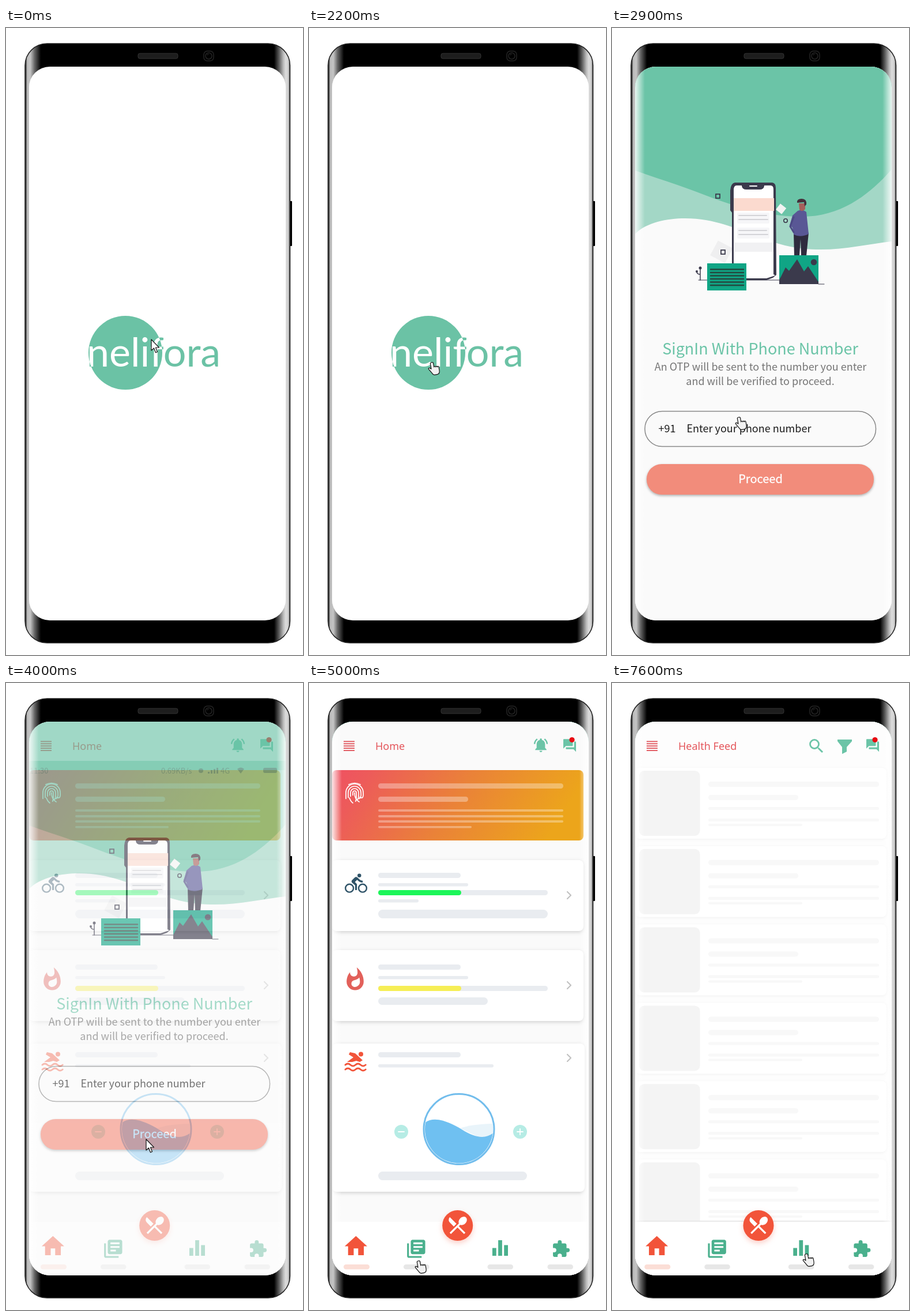
Recreate the animation shown at these times as an HTML page. Size 515x1087 px, loop 8 s.

```html
<!DOCTYPE html>
<html lang="en">
<head>
<meta charset="utf-8">
<title>App walkthrough</title>
<style>
html, body { margin: 0; width: 100%; height: 100%; overflow: hidden; background: #fff; }
svg { display: block; width: 515px; height: 1087px; }
text { white-space: pre; }
.mark { font: 400 70px Lato, sans-serif; }
.form { font-family: "Noto Sans CJK JP", "Noto Sans CJK SC", "Noto Sans CJK KR", "Noto Sans", sans-serif; }
.head { font: 18px "Noto Sans", "Open Sans", sans-serif; fill: #e4575c; }
.card { fill: #fff; filter: drop-shadow(0 2px 3px rgba(0,0,0,.17)); }
.soft { fill: #fff; filter: drop-shadow(0 1px 2px rgba(0,0,0,.05)); }
.line { fill: none; stroke-linecap: round; stroke-linejoin: round; }
</style>
</head>
<body>
<svg viewBox="0 0 515 1087" xmlns="http://www.w3.org/2000/svg">
  <defs>
    <linearGradient id="body">
      <stop offset="0" stop-color="#222"/><stop offset=".004" stop-color="#444"/>
      <stop offset=".008" stop-color="#bbb"/><stop offset=".02" stop-color="#c4c4c4"/>
      <stop offset=".036" stop-color="#666"/><stop offset=".06" stop-color="#000"/>
      <stop offset=".94" stop-color="#000"/><stop offset=".957" stop-color="#555"/>
      <stop offset=".975" stop-color="#bbb"/><stop offset=".984" stop-color="#ddd"/>
      <stop offset=".994" stop-color="#ccc"/><stop offset="1" stop-color="#333"/>
    </linearGradient>
    <linearGradient id="glow">
      <stop offset="0" stop-color="#fff" stop-opacity=".85"/>
      <stop offset="1" stop-color="#fff" stop-opacity="0"/>
    </linearGradient>
    <linearGradient id="warm" x2="1" y2=".18">
      <stop offset="0" stop-color="#ef5162"/><stop offset=".15" stop-color="#ed5b5a"/>
      <stop offset=".55" stop-color="#ea8238"/><stop offset="1" stop-color="#eca51b"/>
    </linearGradient>
    <clipPath id="screen"><rect x="40" y="67" width="445" height="960" rx="36"/></clipPath>
    <clipPath id="disc"><circle cx="207" cy="563" r="64"/></clipPath>
    <clipPath id="bowl"><circle cx="260" cy="773.5" r="59"/></clipPath>
  </defs>

  <rect x="490" y="300" width="6" height="78" rx="1"/>
  <rect x="33" y="27" width="459.500" height="1039" rx="38" fill="url(#body)" stroke="#222" stroke-width="1.500"/>
  <rect x="229" y="44" width="69" height="9" rx="3" fill="#1d1d1d" stroke="#333"/>
  <g fill="none" stroke="#242424" stroke-width="1.500">
    <rect x="343" y="40" width="17" height="17" rx="6"/><circle cx="351.500" cy="48.500" r="5.500"/>
    <path d="M349 47l2-2"/>
  </g>

  <g clip-path="url(#screen)">
    <rect x="40" y="67" width="445" height="960" fill="#fff"/>
    <circle cx="207" cy="563" r="64" fill="#6bc2a5"/>
    <text class="mark" x="140" y="587" fill="#6bc2a5">nelifora</text>
    <text class="mark" x="140" y="587" fill="#fff" clip-path="url(#disc)">nelifora</text>
    <g id="signin"></g>
    <g id="home"></g>
    <g id="status" class="form" font-size="13" font-weight="500" fill="#47665c">
      <rect x="40" y="135" width="445" height="16" fill="#5dbd9c"/>
      <text x="41" y="157">11:30</text>
      <text x="269" y="157">0.69KB/s</text>
      <circle cx="338" cy="152" r="4"/>
      <path d="M350 157v-3h3v3zM355 157v-6h3v6zM360 157v-8h3v8zM365 157v-10h3v10zM401 149q6-5 12 0l-6 8z"/>
      <text x="372" y="157">4G</text>
      <rect x="446" y="147" width="24" height="9" rx="3"/>
    </g>
    <g id="feed"></g>
    <g id="nav"></g>
    <rect x="40" y="67" width="17" height="960" fill="url(#glow)"/>
    <rect x="-485" y="67" width="16" height="960" fill="url(#glow)" transform="scale(-1 1)"/>
  </g>

  <g id="cursor" fill="#fff" stroke="#111" stroke-width="1.200" stroke-linejoin="round">
    <path id="arrow" d="M0 0V19L4.500 15 7.500 22.800 10.500 21.500 7.500 14H13.500Z"/>
    <path id="hand" fill="#f1f1f1" transform="rotate(-10)" d="M0 0c-1.500 0-2 1-2 2.200V11l-2-2c-1.500-1-3.200 0-2.300 1.800L-2 18c1 2.500 2.500 4 4 4h4.500c3.500 0 5-3 5-6.500V10c0-2-2.300-2.200-2.600-.5 0-2-2.600-2.300-2.800-.4 0-2-2.600-2.300-2.800-.4V2c0-1.300-.6-2-1.800-2z"/>
  </g>
</svg>

<script>
const $ = id => document.getElementById(id);
const rect = (x, y, w, h, fill, r = 0, extra = '') =>
  `<rect x="${x}" y="${y}" width="${w}" height="${h}" rx="${r}" fill="${fill}" ${extra}/>`;
const bar = (x, y, w, h, fill = '#e9ecf0') => rect(x, y, w, h, fill, h / 2);
const circle = (x, y, r, fill, extra = '') => `<circle cx="${x}" cy="${y}" r="${r}" fill="${fill}" ${extra}/>`;
const path = (d, fill, extra = '') => `<path d="${d}" fill="${fill}" ${extra}/>`;
const line = (d, stroke, w = 2) => `<path class="line" d="${d}" stroke="${stroke}" stroke-width="${w}"/>`;
const card = (x, y, w, h, cls = 'card') => `<rect class="${cls}" x="${x}" y="${y}" width="${w}" height="${h}" rx="8"/>`;
const text = (x, y, s, attrs = '') => `<text x="${x}" y="${y}" ${attrs}>${s}</text>`;

const icons = {
  search: 'M15.5 14h-.79l-.28-.27A6.47 6.47 0 0 0 16 9.500 6.500 6.500 0 1 0 9.500 16c1.610 0 3.090-.59 4.230-1.570l.27.28v.79l5 4.990L20.490 19zm-6 0a4.500 4.500 0 1 1 0-9 4.500 4.500 0 0 1 0 9z',
  chat: 'M21 6h-2v9H6v2c0 .55.45 1 1 1h11l4 4V7c0-.55-.45-1-1-1zm-4 6V3c0-.55-.45-1-1-1H3c-.55 0-1 .45-1 1v14l4-4h10c.55 0 1-.45 1-1z',
  bell: 'M7.580 4.080L6.150 2.650C3.750 4.480 2.170 7.300 2.030 10.500h2c.15-2.650 1.510-4.970 3.550-6.420zM19.970 10.500h2c-.15-3.200-1.730-6.020-4.120-7.850l-1.420 1.430c2.020 1.450 3.390 3.770 3.540 6.420zM18 11c0-3.070-1.640-5.640-4.500-6.320V4a1.500 1.500 0 0 0-3 0v.68C7.630 5.360 6 7.920 6 11v5l-2 2v1h16v-1l-2-2zM12 22c1.100 0 2-.9 2-2h-4c0 1.100.9 2 2 2z',
  home: 'M10 20v-6h4v6h5v-8h3L12 3 2 12h3v8z',
  chart: 'M10 20h4V4h-4zM4 20h4v-8H4zM16 9v11h4V9z',
  books: 'M4 6H2v14c0 1.100.9 2 2 2h14v-2H4zm16-4H8c-1.100 0-2 .9-2 2v12c0 1.100.9 2 2 2h12c1.100 0 2-.9 2-2V4c0-1.100-.9-2-2-2zm-1 9H9V9h10zm-4 4H9v-2h6zm4-8H9V5h10z',
  puzzle: 'M20.500 11H19V7c0-1.100-.9-2-2-2h-4V3.500a2.500 2.500 0 0 0-5 0V5H4c-1.100 0-2 .9-2 2v3.800h1.500a2.700 2.700 0 0 1 0 5.400H2V20c0 1.100.9 2 2 2h3.800v-1.500a2.700 2.700 0 0 1 5.400 0V22H17c1.100 0 2-.9 2-2v-4h1.500a2.500 2.500 0 0 0 0-5z',
  meal: 'M8.100 13.340l2.830-2.830L3.910 3.500a4 4 0 0 0 0 5.660zM14.880 11.530c1.530.71 3.680.21 5.270-1.380 1.910-1.910 2.280-4.650.81-6.120-1.460-1.460-4.200-1.100-6.120.81-1.590 1.590-2.090 3.740-1.380 5.270L3.700 19.870l1.410 1.410L12 14.410l6.880 6.880 1.410-1.410L13.410 13z',
  bike: 'M15.500 5.500a2 2 0 1 0 0-4 2 2 0 0 0 0 4zM5 12a5 5 0 1 0 0 10 5 5 0 0 0 0-10zm0 8.500a3.500 3.500 0 1 1 0-7 3.500 3.500 0 0 1 0 7zM10.800 10.500l2.400-2.400.8.8c1.300 1.300 3 2.100 5.100 2.100V9c-1.500 0-2.700-.6-3.600-1.500l-1.900-1.900c-.5-.4-1-.6-1.600-.6s-1.100.2-1.400.6L7.800 8.400c-.4.4-.6.9-.6 1.400 0 .6.2 1.100.6 1.400L11 14v5h2v-6.200zM19 12a5 5 0 1 0 0 10 5 5 0 0 0 0-10zm0 8.500a3.500 3.500 0 1 1 0-7 3.500 3.500 0 0 1 0 7z',
  fire: 'M13.500.67s.74 2.650.74 4.800c0 2.060-1.350 3.730-3.410 3.730-2.070 0-3.630-1.670-3.630-3.730l.03-.36C5.210 7.510 4 10.620 4 14a8 8 0 0 0 16 0C20 8.610 17.410 3.800 13.500.67zM11.710 19c-1.780 0-3.220-1.400-3.220-3.140 0-1.620 1.050-2.760 2.810-3.120 1.770-.36 3.600-1.210 4.620-2.580.39 1.290.59 2.650.59 4.040 0 2.650-2.150 4.800-4.800 4.800z'
};
const icon = (name, x, y, k, fill) =>
  path(icons[name], fill, `fill-rule="evenodd" transform="translate(${x} ${y}) scale(${k})"`);

const mint = '#6bc4a7', teal = '#4ab08d', coral = '#f2543a', ink = '#3b3a4c';

function signInArt() {
  let s = rect(176, 372, 29, 29, '#efeff0', 0, 'transform="rotate(28 187 386)"')
    + rect(287, 307, 13, 13, '#f1f3f2', 0, 'transform="rotate(38 293 313)"')
    + line('M150 437H292M358 444H368', ink, 1)
    + path('M213 268H278Q284 269 284 277L285 428 279 433 268 437H208V320L205 316V282Q206 269 213 268Z', ink)
    + path('M216 273H275Q280 273 280 280V427L283 429 268 434H219Q211 433 211 425V281Q211 273 216 273Z', '#fff')
    + path('M225 268H264V274Q263 280 256 280H233Q226 280 225 274Z', ink)
    + bar(238, 273, 14, 2, '#fff')
    + rect(211, 295, 70, 22, '#fbdacf')
    + rect(212, 372, 68, 16, '#f1f1f3');
  for (const y of [320, 346]) {
    s += rect(217, y, 56, 19, '#f6f6f8', 2) + bar(219, y + 4, 50, 2, '#d4d4d8') + bar(219, y + 11, 52, 2, '#d4d4d8');
  }
  for (const [x, y] of [[180, 288], [189, 385]]) {
    s += rect(x, y, 7, 7, 'none', 0, `stroke="${ink}" stroke-width="1.800"`);
  }
  s += circle(301, 334, 3.2, 'none', `stroke="${ink}" stroke-width="1.600"`);
  s += rect(165, 408, 68, 47, '#10a585');
  for (let i = 0; i < 6; i++) s += line(`M171 ${418.5 + i * 5.5}H228`, '#24483f', 2.5);
  s += line('M153 437V417M153 427Q147 427 147 422', ink, 1.5) + circle(153, 416, 2.5, ink) + circle(147, 422, 2, ink);
  // standing figure
  s += path('M315 355H341L337 395H328L327 366 325 395H316Z', '#2e2b3e')
    + path('M322 317Q330 313 337 319L341 357Q327 364 315 358L313 346 308 342 313 325Z', '#595795')
    + line('M315 328L309 344 315 354', '#4c4a84', 3)
    + path('M324 304H335V314Q330 320 325 315Z', '#a5605b')
    + path('M321 303Q320 296 329 296 338 296 337 306L334 309 333 302Z', '#44303b');
  return s + rect(290, 394, 68, 50, '#10a585')
    + path('M290 437L301 415 307 421 321 401 333 422 340 413 358 440V444H290Z', ink) + circle(350, 406, 5.3, ink);
}

$('signin').innerHTML = rect(40, 67, 445, 960, '#fafafa')
  + path('M40 67H485V370C430 376 370 394 300 377 240 362 195 330 127 330 95 330 60 337 40 357Z', '#a3d7c6')
  + path('M40 67H485V245C450 285 400 327 330 327 250 327 190 300 130 278 100 267 70 258 40 247Z', mint)
  + signInArt()
  + `<g class="form" text-anchor="middle">`
  + text(257, 566, 'SignIn With Phone Number', `font-size="27" fill="${mint}"`)
  + text(257.500, 594, 'An OTP will be sent to the number you enter', 'font-size="18" fill="#757575"')
  + text(257, 619, 'and will be verified to proceed.', 'font-size="18" fill="#757575"') + '</g>'
  + rect(57, 664.5, 400.5, 61, '#fafafa', 30, 'stroke="#888" stroke-width="1.500"')
  + `<g class="form" font-size="18" fill="#1c1c1c">` + text(80.500, 701, '+91') + text(129.500, 701, 'Enter your phone number') + '</g>'
  + rect(60, 756, 394, 53, '#f28c7b', 26, 'style="filter:drop-shadow(0 2px 2px rgba(0,0,0,.3))"')
  + text(257.500, 789, 'Proceed', 'class="form" text-anchor="middle" font-size="20" font-weight="500" fill="#fff" stroke="#fff" stroke-width=".3"');

function header(title) {
  let s = text(115, 116, title, 'class="head"');
  for (let i = 0; i < 5; i++) s += rect(60, 100.5 + i * 3.9, 19, 1.8, '#e0535a');
  return s + icon('chat', 438.8, 95, 1.1, mint) + circle(456, 98.5, 4.6, '#e80b12');
}
const chevron = y => line(`M448 ${y - 6}l6 6 -6 6`, '#c2c2c2', 2.2);
const progress = (y, color) => bar(120, y, 294, 9) + bar(120, y, 144, 9, color);
const round = (x, glyph) => circle(x, 778, 12, '#b6ece5') + line(glyph, '#fff', 1.8);

function fingerprint() {
  let s = '';
  for (let r = 3; r <= 15; r += 4) {
    s += line(`M${79 - r} ${193 + r * .5}V${190}a${r} ${r} 0 0 1 ${2 * r} 0q1 ${8 + r * .3} -${r * .4} ${17 - r * .6}`, '#fff', 1.7);
  }
  return s + line('M79 190q0 12 8 16M70 199q2 6 6 9M69 176q10-5 20 0', '#fff', 1.700);
}

function swimmer() {
  const wave = y => `M63 ${y}q4.400 -4 8.800 0t8.800 0 8.800 0 8.800 0`;
  return line(wave(662), coral, 3) + line(wave(670), coral, 3)
    + circle(90, 643.5, 4, coral) + path('M66 657L77 649 69 644 71 640 80 642 93 654 88 657 82 655 75 657Z', coral);
}

$('home').innerHTML = rect(40, 67, 445, 960, '#fafafa') + header('Home')
  + icon('bell', 387.4, 93, 1.22, mint)
  + rect(40, 151, 436, 122, 'url(#warm)', 8) + fingerprint() + '<g opacity=".33">'
  + [[174, 321, 9], [197, 156, 9], [219, 321, 4], [229, 321, 4], [238, 321, 4], [248, 162, 3.5]]
      .map(([y, w, h]) => bar(120, y, w, h, '#fff')).join('') + '</g>'
  + card(40, 307, 436, 123) + icon('bike', 62, 328, 1.63, '#2f5368')
  + bar(120, 329, 143, 9) + bar(120, 347, 156, 5.5) + progress(359, '#1cf659') + bar(120, 375, 70, 5.5) + bar(120, 393, 294, 15) + chevron(368)
  + card(40, 463, 436, 123) + icon('fire', 57.8, 491.8, 1.85, '#e2605a')
  + bar(120, 488, 143, 9) + bar(120, 508, 156, 5.5) + progress(525, '#f6ee55') + bar(120, 545, 190, 13) + chevron(524)
  + card(40, 625, 438, 257) + swimmer() + bar(120, 640, 143, 9) + bar(120, 661, 200, 5.5) + chevron(650)
  + '<g clip-path="url(#bowl)">'
  + path('M262 772Q285 764 325 764V790H300Z', '#e9f4fa')
  + path('M198 765C215 747 245 762 265 774 290 790 310 792 325 775V840H198Z', '#6fc0f1') + '</g>'
  + circle(260, 773.5, 61, 'none', 'stroke="#72bdec" stroke-width="3"')
  + round(160, 'M155 778h10') + round(366, 'M361 778h10M366 773v10') + bar(120, 847, 258, 15);

let feed = rect(40, 67, 445, 960, '#fdfdfd') + header('Health Feed')
  + icon('search', 338, 93, 1.37, mint)
  + path('M391 98H416V101L407 111V119L399 123V111L391 101Z', mint);
for (let i = 0; i < 6; i++) {
  const y = 152 + i * 135.8;
  feed += card(40, y - 5, 436, 123, 'soft') + rect(47, y, 105.5, 113, '#f4f4f4', 9)
    + [[19, 296, 9], [42, 156, 9], [63, 296, 5], [83, 296, 5], [92, 163, 4]]
        .map(([dy, w, h]) => bar(167, y + dy, w, h, '#f8f8f8')).join('');
}
$('feed').innerHTML = feed;

$('nav').innerHTML = `<g id="edge">${rect(36, 932, 460, 2, '#e9e9e9')}</g>` + rect(36, 934, 460, 95, '#fff')
  + icon('home', 58, 953, 1.95, coral) + icon('books', 167, 962, 1.57, teal)
  + icon('chart', 311.2, 959.2, 1.69, teal) + icon('puzzle', 420.3, 964.6, 1.38, teal)
  + bar(60, 1008, 45, 8.5, '#fbded6')
  + [164, 309.5, 413.5].map(x => bar(x, 1008, 44.5, 8.5, '#e7e7e7')).join('')
  + circle(257.7, 940.5, 26.5, coral, 'style="filter:drop-shadow(0 4px 5px rgba(242,84,58,.28))"')
  + icon('meal', 237.7, 920.2, 1.65, '#fff');

// time, x, y, pointing hand
const moves = [
  [0, 252, 540, 0], [300, 252, 540, 0], [500, 269, 545, 0], [800, 220, 556, 0], [1300, 220, 556, 0],
  [1600, 240, 412, 0], [1900, 180, 500, 1], [2200, 212, 580, 1], [2400, 212, 580, 1],
  [2900, 219, 675, 1], [3500, 246, 780, 1], [3950, 243, 791, 0], [4200, 243, 791, 0],
  [4800, 191, 996, 1], [5000, 189, 1002, 1], [5800, 187, 999, 1], [5950, 184, 996, 0],
  [6900, 184, 996, 0], [7200, 265, 1004, 0], [7400, 358, 1003, 1], [7600, 336, 990, 1], [8000, 336, 990, 1]
];

const fade = (t, start) => 1 - (1 - Math.min(1, Math.max(0, (t - start) / 500))) ** 5;

function draw(t) {
  const toHome = fade(t, 3955), toFeed = fade(t, 5900);
  $('signin').setAttribute('opacity', fade(t, 2350));
  $('home').setAttribute('opacity', toHome);
  $('status').setAttribute('opacity', 1.7 * toHome * (1 - toHome));
  $('feed').setAttribute('opacity', toFeed);
  $('nav').setAttribute('opacity', toHome);
  $('nav').setAttribute('transform', `translate(${-3.7 * toFeed} 0)`);
  $('edge').setAttribute('opacity', toFeed);

  const i = Math.max(1, moves.findIndex(m => m[0] > t));
  const [t0, x0, y0, hand] = moves[i - 1], [t1, x1, y1] = moves[i];
  const u = (t - t0) / (t1 - t0), k = u * u * (3 - 2 * u);
  $('cursor').setAttribute('transform', `translate(${x0 + (x1 - x0) * k} ${y0 + (y1 - y0) * k})`);
  $('hand').style.display = hand ? '' : 'none';
  $('arrow').style.display = hand ? 'none' : '';
}

const begin = performance.now();
function tick() {
  const t = (performance.now() - begin) % 8000;
  draw(Math.floor(t / 100) * 100); // ten pictures a second
  requestAnimationFrame(tick);
}
tick();
</script>
</body>
</html>
```
